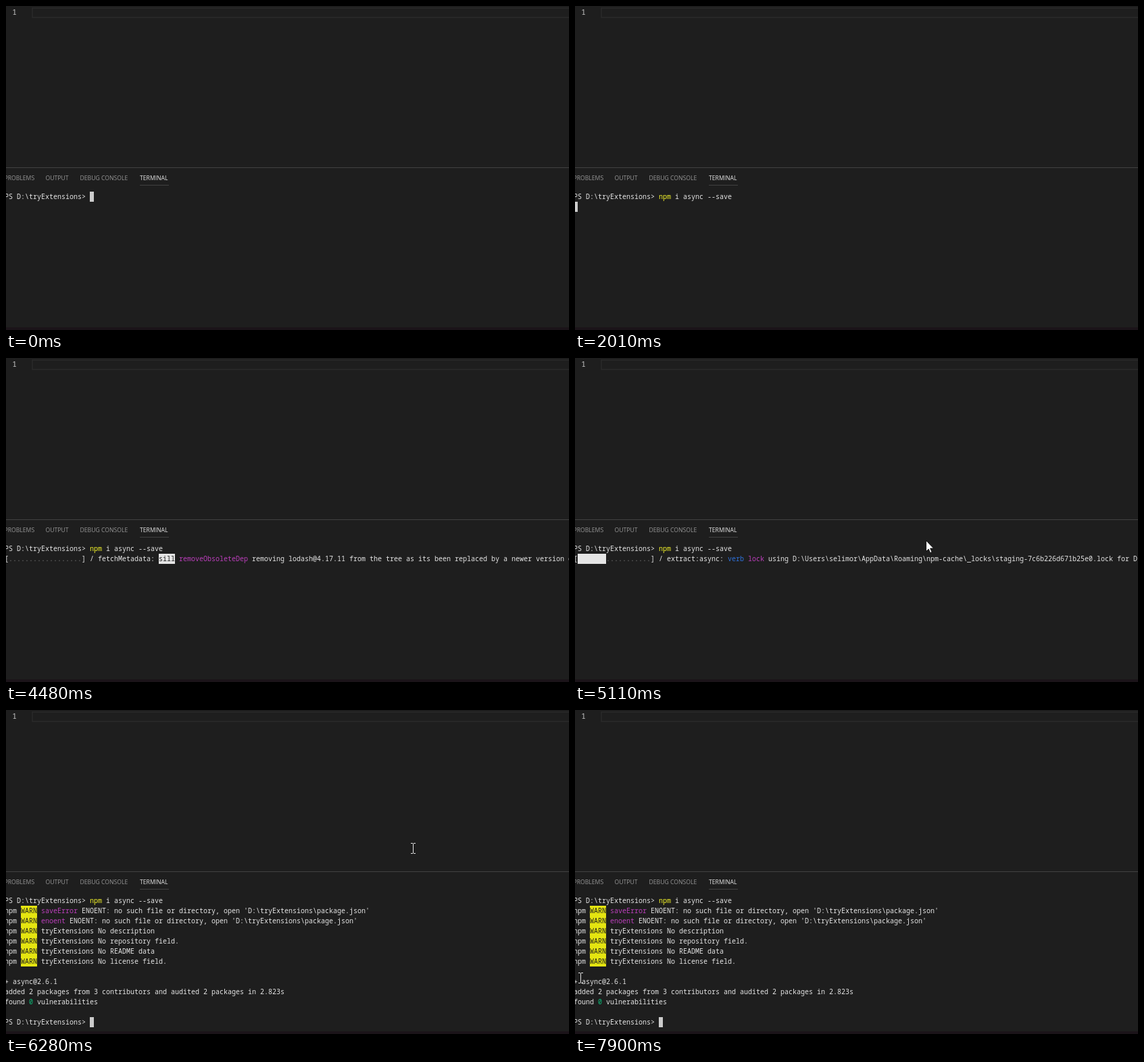
Recreate the animation shown at these times as an HTML page. Size 833 px wide and 480 px high, loop 7990 ms.

```html
<!DOCTYPE html>
<html lang="en">
<head>
<meta charset="utf-8">
<title>Terminal package install</title>
<style>
  html, body { margin: 0; width: 100%; height: 100%; overflow: hidden; background: #1e1e1e; }
  svg { display: block; width: 833px; height: 480px; }
  text { white-space: pre; }
  .mono { font: 10px "Noto Sans Mono", "DejaVu Sans Mono", monospace; }
  .number { font-size: 11px; }
  .tab { font: 8.65px "Open Sans", "Noto Sans", sans-serif; fill: #989898; }
  .active { fill: #e7e7e7; }
</style>
</head>
<body>
<svg viewBox="0 0 833 480" xmlns="http://www.w3.org/2000/svg">
  <rect width="833" height="480" fill="#1e1e1e"/>
  <rect x="39" y="3" width="900" height="14" fill="none" stroke="#2a2a2a" stroke-width="1.6"/>
  <text class="mono number" x="9.3" y="13" fill="#c6c6c6">1</text>
  <rect y="239" width="833" height="1" fill="#414141"/>
  <text class="tab" x="-2.5" y="258">PROBLEMS</text>
  <text class="tab" x="58.5" y="258">OUTPUT</text>
  <text class="tab" x="109.5" y="258">DEBUG CONSOLE</text>
  <text class="tab active" x="198" y="258">TERMINAL</text>
  <rect x="198" y="265" width="43" height="1" fill="#414141"/>
  <g id="screen" class="mono"></g>
  <rect y="476" width="833" height="4" fill="#1b1419"/>
  <path id="arrow" d="M.5 .5V16.5L4.2 13L6.6 18.5L9 17.5L6.6 12H11.5Z" fill="#fff" stroke="#000" stroke-width=".8"/>
  <path id="beam" d="M0 .5H3M4 .5H7M3.5 1V15M0 15.5H3M4 15.5H7" fill="none" stroke="#e6e6e6"/>
</svg>
<script>
const LOOP = 7990;
const CELL = 6, ROW = 15, LEFT = -2, TOP = 275;
const raw = String.raw;

// Inline marks such as {m:text} set a style: [ink, background].
const STYLES = {
  d: ["#e5e5e5"],
  y: ["#f5f52a"],
  m: ["#bc3fbc"],
  b: ["#2f72dc"],
  g: ["#0dbc79"],
  k: ["#777777"],
  w: ["#1e1e1e", "#e5e510"],
  s: ["#1e1e1e", "#e5e5e5"],
  c: ["#cccccc", "#cccccc"]
};

const prompt = raw`PS D:\tryExtensions> `;
const command = prompt + "{y:npm} i async --save";
const cursor = "{c: }";
const warn = text => "npm {w:WARN} " + text;

function progress(done, spin, text) {
  const filled = done ? `{s:${" ".repeat(done)}}` : "";
  return [command, `[${filled}{k:${".".repeat(18 - done)}}] ${spin} ${text}`];
}

const lockText = raw`extract:async: {b:verb} {m:lock} using D:\Users\selimor\AppData\Roaming\npm-cache\_locks\staging-7c6b226d671b25e0.lock for D:\tryExtensions`;
const doneText = raw`extract:async: {s:sill} {m:extract} async@latest extracted to D:\tryExtensions\node_modules\.staging\async-bc603bc7 (448ms)`;
const missing = raw`ENOENT: no such file or directory, open 'D:\tryExtensions\package.json'`;

const report = [
  command,
  warn("{m:saveError} " + missing),
  warn("{m:enoent} " + missing),
  warn("tryExtensions No description"),
  warn("tryExtensions No repository field."),
  warn("tryExtensions No README data"),
  warn("tryExtensions No license field."),
  "",
  "+ async@2.6.1",
  "added 2 packages from 3 contributors and audited 2 packages in 2.823s",
  "found {g:0} vulnerabilities",
  ""
];

// [start time, rows]
const screens = [
  [0, [prompt + cursor]],
  [760, [command + cursor]],
  [1460, [command, cursor]],
  [3560, progress(0, "/", "rollbackFailedOptional: {b:verb} {m:npm-session} 5e91c07ab34d62f8")],
  [4480, progress(0, "/", "fetchMetadata: {s:sill} {m:removeObsoleteDep} removing lodash@4.17.11 from the tree as its been replaced by a newer version or is no longer required")],
  [4630, progress(7, "/", "extract:async: {s:sill} {m:extract} async@latest")],
  [4710, progress(7, "/", lockText)],
  [5180, progress(9, "\\", doneText)],
  [5970, progress(9, "/", doneText)],
  [6200, report],
  [6280, [...report, prompt + cursor]]
];

// [start time, shape, x, y]; arrows use the tip, beams the centre
const pointer = [
  [0, "none", 0, 0],
  [70, "arrow", 602, 400],
  [130, "arrow", 552, 375],
  [290, "arrow", 541, 370],
  [360, "arrow", 552, 372],
  [1930, "arrow", 705, 294],
  [2010, "none", 0, 0],
  [5030, "arrow", 516, 281],
  [5110, "arrow", 519, 270],
  [5180, "arrow", 530, 251],
  [5260, "beam", 546, 233],
  [5340, "beam", 559, 223],
  [5420, "beam", 564, 220],
  [6200, "beam", 588, 211],
  [6280, "beam", 602, 205],
  ...sweep(6660, 80, [[590, 236], [553, 320], [514, 401], [498, 423]]),
  ...sweep(7290, 76.25, [[484, 425], [418, 424], [312, 421], [196, 416],
    [102, 410], [42, 405], [14, 401], [5, 398], [8, 397]])
];

function sweep(start, step, points) {
  return points.map(([x, y], i) => [start + i * step, "beam", x, y]);
}

const byId = id => document.getElementById(id);
const screen = byId("screen");
const shapes = { arrow: byId("arrow"), beam: byId("beam") };

function add(tag, attrs, content = "") {
  const node = document.createElementNS("http://www.w3.org/2000/svg", tag);
  for (const name in attrs) node.setAttribute(name, attrs[name]);
  node.textContent = content;
  screen.append(node);
}

function drawRow(line, row) {
  const y = TOP + row * ROW;
  let col = 0;
  for (const [all, mark, marked] of line.matchAll(/\{(\w):(.*?)\}|[^{]+/g)) {
    const text = mark ? marked : all;
    const [ink, back] = STYLES[mark || "d"];
    const x = LEFT + col * CELL;
    if (back) add("rect", { x, y, width: text.length * CELL, height: ROW, fill: back });
    if (text.trim()) add("text", { x, y: y + 11, fill: ink }, text);
    col += text.length;
  }
}

const at = (list, t) => list.findLast(item => item[0] <= t);
let shown;

function render(t) {
  const rows = at(screens, t)[1];
  if (rows !== shown) {
    screen.replaceChildren();
    rows.forEach(drawRow);
    shown = rows;
  }
  const [, kind, x, y] = at(pointer, t);
  for (const name in shapes) shapes[name].style.display = name === kind ? "" : "none";
  if (kind === "arrow") shapes.arrow.setAttribute("transform", `translate(${x} ${y})`);
  if (kind === "beam") shapes.beam.setAttribute("transform", `translate(${x - 3} ${y - 8})`);
}

const start = performance.now();
function tick() {
  render((performance.now() - start) % LOOP);
  requestAnimationFrame(tick);
}
tick();
</script>
</body>
</html>
```
